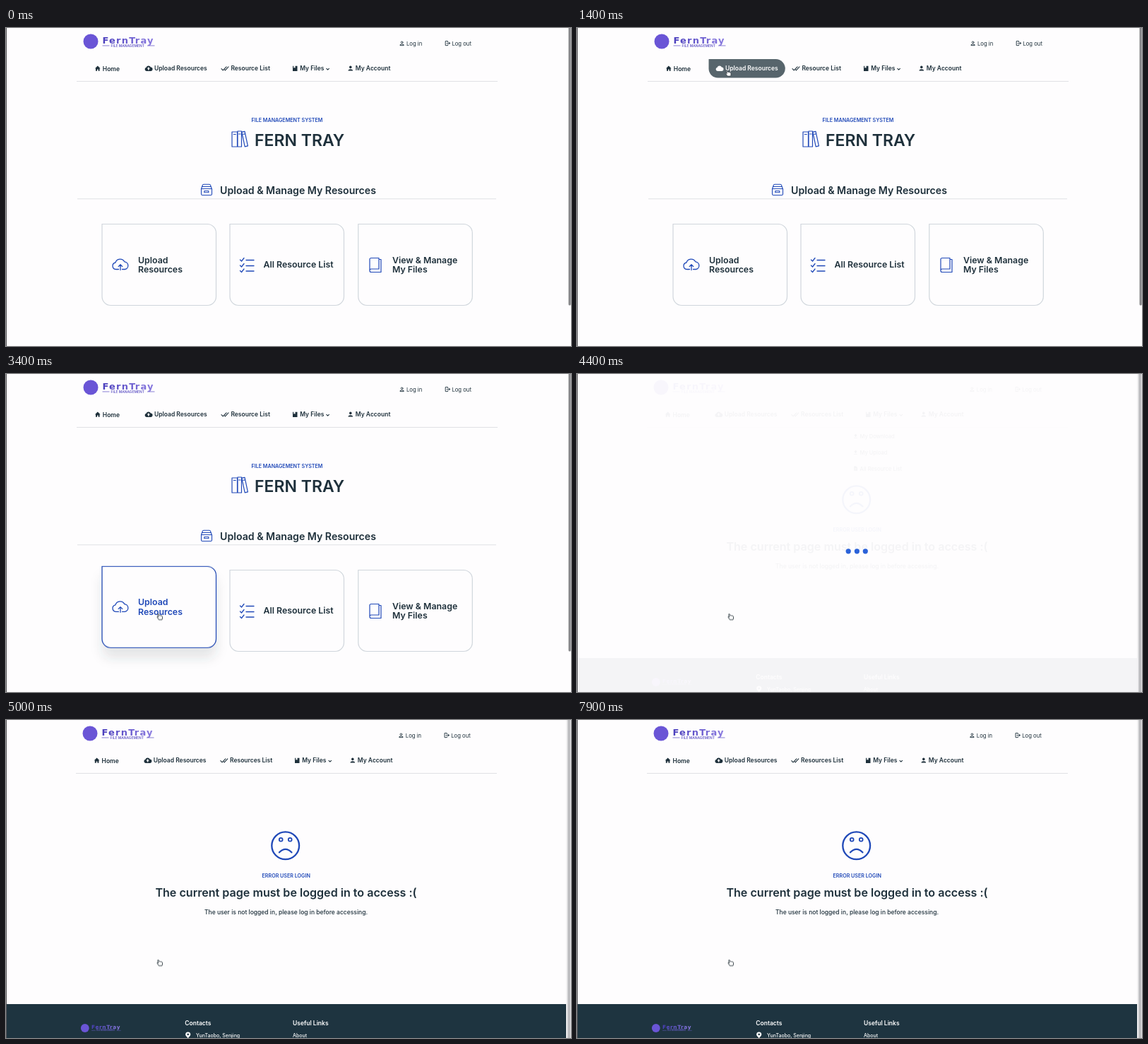
These frames come from a looping animation (800 by 450 pixels, 8 s). An HTML page:

```html
<!DOCTYPE html>
<html lang="en">
<head>
<meta charset="utf-8">
<title>File management demo</title>
<style>
  html, body { margin: 0; width: 100%; height: 100%; overflow: hidden; background: #fefdfe; }
  svg { display: block; width: 100vw; height: 100vh; color: #1e303b; font: 600 8.5px Inter, "Open Sans", sans-serif; }
  text { fill: currentColor; }
  .fill { fill: currentColor; }
  .line { fill: none; stroke: currentColor; stroke-linecap: round; stroke-linejoin: round; }
  .blue { color: #2049b8; }
  .small { font-size: 7.7px; font-weight: 400; }
  .menu { font-size: 7.5px; font-weight: 500; }
  .kicker { font-size: 7.15px; text-anchor: middle; }
  .title { font-size: 23px; }
  .section { font-size: 14.15px; }
  .card text { font-size: 12.35px; }
  .error { font-size: 16.1px; text-anchor: middle; }
  .note { font-size: 8.5px; font-weight: 500; text-anchor: middle; }
  .foot { font-size: 7px; font-weight: 500; }
  .brand { font: bold 13px "DejaVu Sans", sans-serif; letter-spacing: 1.2px; fill: url(#violet); }
  .tag { font-size: 4.9px; fill: #6a5fc9; }
  .pill { color: #fff; }
  .pill path { fill: #56646b; }

  /* every part shares one 8 s clock */
  .anim { animation: 8s linear infinite; }
  .page1 { animation-name: page1; animation-timing-function: step-end; }
  .page2 { animation-name: page2; animation-timing-function: step-end; }
  .p-files { animation-name: pFiles; }
  .p-list { animation-name: pList; }
  .p-upload { animation-name: pUpload; }
  .p-home { animation-name: pHome; }
  .drop { animation-name: drop; }
  .drop2 { animation-name: drop2; }
  .chev { animation-name: chev; animation-timing-function: step-end; }
  .lift { animation-name: lift; animation-timing-function: ease; }
  .glow { animation-name: glow; animation-timing-function: ease; }
  .veil { animation-name: veil; }
  .dots { animation-name: dots; }
  .cursor { animation-name: move; animation-timing-function: ease-in-out; }
  .hand { animation-name: hand; animation-timing-function: step-end; }
  .arrow { animation-name: arrow; animation-timing-function: step-end; }
  .dots circle { animation: pulse .8s ease-in-out infinite; }

  @keyframes page1 { 0% { visibility: visible } 49.4%, 100% { visibility: hidden } }
  @keyframes page2 { 0% { visibility: hidden } 49.4%, 100% { visibility: visible } }
  @keyframes pFiles { 0%, 7% { opacity: 0 } 8.5%, 9.5% { opacity: 1 } 11.5%, 100% { opacity: 0 } }
  @keyframes pList { 0%, 9.8% { opacity: 0 } 11.2%, 13% { opacity: 1 } 15%, 100% { opacity: 0 } }
  @keyframes pUpload { 0%, 13.1% { opacity: 0 } 14.4%, 17.5% { opacity: 1 } 20%, 100% { opacity: 0 } }
  @keyframes pHome { 0%, 18% { opacity: 0 } 20%, 31% { opacity: 1 } 33.5%, 100% { opacity: 0 } }
  @keyframes drop { 0%, 7% { opacity: 0 } 10%, 13% { opacity: 1 } 15.5%, 100% { opacity: 0 } }
  @keyframes drop2 { 0%, 55% { opacity: 1 } 57.5%, 100% { opacity: 0 } }
  @keyframes chev { 0% { opacity: 1 } 7% { opacity: 0 } 15%, 100% { opacity: 1 } }
  @keyframes lift {
    0%, 36% { transform: translateY(0); color: #1e303b }
    39.5%, 100% { transform: translateY(-5.2px); color: #2049b8 }
  }
  @keyframes glow { 0%, 36% { opacity: 0 } 39.5%, 100% { opacity: 1 } }
  @keyframes veil { 0%, 54.5% { opacity: 1 } 55%, 55.1% { opacity: .955 } 60%, 100% { opacity: 0 } }
  @keyframes dots { 0%, 55.1% { opacity: 1 } 60%, 100% { opacity: 0 } }
  @keyframes pulse { 0%, 100% { r: 2.6px } 50% { r: 3.6px } }
  @keyframes move {
    0%, 3.5% { transform: translate(575px, 92px) }
    6% { transform: translate(510px, 64px) }
    8% { transform: translate(438px, 63px) }
    10.5% { transform: translate(345px, 64px) }
    12.5%, 15% { transform: translate(270px, 66px) }
    20%, 30% { transform: translate(160px, 62px) }
    37%, 40% { transform: translate(212px, 325px) }
    42.5%, 100% { transform: translate(218px, 343.5px) }
  }
  @keyframes hand { 0% { opacity: 0 } 5% { opacity: 1 } 31% { opacity: 0 } 36%, 100% { opacity: 1 } }
  @keyframes arrow { 0% { opacity: 0 } 2.5% { opacity: 1 } 5% { opacity: 0 } 31% { opacity: 1 } 36%, 100% { opacity: 0 } }
</style>
</head>
<body>
<svg viewBox="0 0 800 450">
  <defs>
    <linearGradient id="violet">
      <stop offset="0" stop-color="#4b3fbd"/>
      <stop offset="1" stop-color="#8b7be0"/>
    </linearGradient>
    <filter id="soft" x="-30%" y="-30%" width="160%" height="160%"><feGaussianBlur stdDeviation="8"/></filter>

    <g id="logo">
      <circle cx="120" cy="19" r="10.5" fill="#6a55d6"/>
      <text class="brand" x="136.5" y="21.5">FernTray</text>
      <path d="M136.5 25h10M200 25h10.5" stroke="#6a5fc9" stroke-width=".8"/>
      <text class="tag" x="148.5" y="26.8">FILE MANAGEMENT</text>
    </g>

    <g id="auth" class="small">
      <g class="line" stroke-width=".9">
        <circle cx="560.6" cy="20.3" r="1.3"/>
        <path d="M558 24.3v-.6q2.6-1.8 5.2 0v.6z"/>
        <path d="M625.5 19.6v-1h-3.3v6.1h3.3v-1M624.2 21.6h4.4l-1.5-1.5m1.5 1.5l-1.5 1.5"/>
      </g>
      <text x="567" y="24.6">Log in</text>
      <text x="631.4" y="24.6">Log out</text>
    </g>

    <g id="home">
      <path class="fill" d="M126 57.2l3.8-3.8 3.8 3.8h-1v3.6h-2v-2.4h-1.6v2.4h-2v-3.6z"/>
      <text x="136.8" y="61">Home</text>
    </g>
    <g id="upload">
      <path class="fill" d="M199 61a2.7 2.7 0 0 1-.4-5.3 3.4 3.4 0 0 1 6.3-.3 2.8 2.8 0 0 1-.3 5.6z"/>
      <path d="M201.8 55.3l2.2 2.3h-1.4v1.9h-1.6v-1.9h-1.4z" fill="#fefdfe"/>
      <text x="210" y="60.2">Upload Resources</text>
    </g>
    <path id="checks" class="line" stroke-width="1.1" d="M305 57.6l2.2 2.3 4.9-5.1M309.6 59.2l.8.7 4.6-5.1"/>
    <g id="list">
      <use href="#checks"/>
      <text x="318.4" y="60.2">Resource List</text>
    </g>
    <g id="files">
      <path class="fill" d="M406 53.8h1.2v3l1.2-.8 1.2.8v-3h2.9v7.2h-6.5z"/>
      <text x="416.2" y="60.2">My Files</text>
    </g>
    <path id="down" class="line" stroke-width="1.1" d="M453.8 57.4l1.8 1.7 1.8-1.7"/>
    <g id="account">
      <g class="fill">
        <circle cx="487.8" cy="55.4" r="1.8"/>
        <path d="M484.6 60.4v-.8q3.2-2.7 6.4 0v.8z"/>
      </g>
      <text x="494.8" y="60.2">My Account</text>
    </g>

    <path id="arrowUp" class="fill" d="M388.5 83.8l2.3 2.5h-1.4v1.8h-1.8v-1.8h-1.4zM386.2 88.9h4.6v.9h-4.6z"/>
    <g id="dropdown" class="menu">
      <use href="#arrowUp"/>
      <use href="#arrowUp" y="23"/>
      <path class="fill" d="M386.2 129.6h3l1.8 1.8v4.4h-4.8z"/>
      <path d="M387.2 132.6h2.6m-2.6 1.5h2.6" stroke="#fff" stroke-width=".6"/>
      <text x="394.6" y="89.7">My Download</text>
      <text x="394.6" y="112.7">My Upload</text>
      <text x="394.6" y="135.7">All Resource List</text>
    </g>

    <path id="frame" d="M136 277.5H285a12.5 12.5 0 0 1 12.5 12.5V380a12.5 12.5 0 0 1-12.5 12.5H148.5a12.5 12.5 0 0 1-12.5-12.5z"/>
  </defs>

  <rect width="800" height="450" fill="#fefdfe"/>

  <g class="anim page1">
    <use href="#logo"/>
    <use href="#auth"/>
    <path d="M100 75.5h596M101 241.8h593" stroke="#e0e1e5"/>
    <use href="#home"/>
    <use href="#upload"/>
    <use href="#list"/>
    <use href="#files"/>
    <use href="#down" class="anim chev"/>
    <use href="#account"/>

    <g class="anim pill p-files">
      <path d="M396 44h59a13.2 13.2 0 0 1 0 26.5h-46a13 13 0 0 1-13-13z"/>
      <use href="#files"/>
    </g>
    <g class="anim pill p-list">
      <path d="M295 44h76a13.2 13.2 0 0 1 0 26.5h-63a13 13 0 0 1-13-13z"/>
      <use href="#list"/>
    </g>
    <g class="anim pill p-upload">
      <path d="M186.5 44h95a13.2 13.2 0 0 1 0 26.5h-82a13 13 0 0 1-13-13z"/>
      <use href="#upload"/>
    </g>
    <g class="anim pill p-home">
      <path d="M100.5 44h72a13.2 13.2 0 0 1 0 26.5h-59a13 13 0 0 1-13-13z"/>
      <use href="#home"/>
    </g>

    <text class="kicker blue" x="398" y="133.2">FILE MANAGEMENT SYSTEM</text>
    <path class="line blue" stroke-width="1.2" d="M320 147h7.5v21h-7.5zM328 146h5.5v22h-5.5zM333.8 147.2l4.2-.9 4.4 20.6-4.2.9zM322.3 150.5h3M329.7 150h2.2M336 150.4l2-.4"/>
    <text class="title" x="352" y="166.8">FERN TRAY</text>

    <path class="line blue" stroke-width="1.1" d="M276.5 227.5l1.8-5q.4-1.2 1.6-1.2h8q1.200 0 1.600 1.200l1.800 5zv7.500q0 1.500 1.500 1.500h12q1.500 0 1.500-1.500v-7.500M278 224.500h11.800M280.800 230.500v2.200h6v-2.200z"/>
    <text class="section" x="303" y="235.2">Upload &amp; Manage My Resources</text>

    <g class="anim card lift">
      <use href="#frame" class="anim glow" y="15" fill="#3c4450" fill-opacity=".13" filter="url(#soft)"/>
      <use href="#frame" fill="#fefdfe" stroke="#d0d6dc" stroke-width="1.2"/>
      <use href="#frame" class="anim glow" fill="none" stroke="#2049b8" stroke-width="1.2"/>
      <path class="line blue" stroke-width="1.3" d="M159.5 341.500h-4a4.800 4.800 0 0 1-.6-9.500 7 7 0 0 1 12.900-1.200 5.400 5.400 0 0 1 .6 10.700h-3.900M162 342.500v-7.500m-2.800 2.600l2.800-2.800 2.800 2.800"/>
      <text x="187" y="332.6">Upload</text>
      <text x="187" y="346.3">Resources</text>
    </g>
    <g class="card">
      <use href="#frame" x="181" fill="#fefdfe" stroke="#d0d6dc" stroke-width="1.2"/>
      <path class="line blue" stroke-width="1.3" d="M331.5 328l2 2 3.5-4.5M331.5 336l2 2 3.5-4.5M331.5 343.5l2 2 3.5-4.5M340 328.5h11M340 336.5h11M340 344h11"/>
      <text x="364.5" y="339.3">All Resource List</text>
    </g>
    <g class="card">
      <use href="#frame" x="362.8" fill="#fefdfe" stroke="#d0d6dc" stroke-width="1.2"/>
      <path class="line blue" stroke-width="1.2" d="M515 343v-15.500q0-2 2-2h11v15.500h-11q-2 0-2 2.200 0 2.300 2 2.300h14v-18h-2.500"/>
      <text x="547" y="332.6">View &amp; Manage</text>
      <text x="547" y="346.3">My Files</text>
    </g>

    <g class="anim drop">
      <rect x="375" y="78" width="132" height="66" fill="#445870" opacity=".13" filter="url(#soft)"/>
      <rect x="375" y="76" width="132" height="68" fill="#fefdfe"/>
      <use href="#dropdown"/>
    </g>
    <rect x="796.5" y="-4" width="3.2" height="396.5" rx="1.6" fill="#858588"/>
  </g>

  <g class="anim page2">
    <use href="#logo" x="-1"/>
    <use href="#auth" x="-1.2"/>
    <path d="M99 75.5h596" stroke="#e0e1e5"/>
    <use href="#home" x="-1.2"/>
    <use href="#upload" x="-1.2"/>
    <use href="#checks" x="-1.2"/>
    <text x="317" y="60.2">Resources List</text>
    <use href="#files" x="3"/>
    <use href="#down" x="3.2"/>
    <use href="#account" x="3"/>
    <use href="#dropdown" class="anim drop2" x="6" y="1"/>

    <g class="line blue" stroke-width="2.3">
      <circle cx="395.7" cy="177.8" r="19.4"/>
      <g stroke-width="1.8">
        <circle cx="389.2" cy="169.3" r="2.4"/>
        <circle cx="402.2" cy="169.3" r="2.4"/>
      </g>
      <path d="M387 187.3q8.7-9 17.4 0"/>
    </g>
    <text class="kicker blue" x="396.7" y="223">ERROR USER LOGIN</text>
    <text class="error" x="396.5" y="250">The current page must be logged in to access :(</text>
    <text class="note" x="396.5" y="274.9">The user is not logged in, please log in before accessing.</text>

    <rect y="402" width="793.5" height="48" fill="#1e3440"/>
    <use href="#logo" transform="translate(44.3 425.3) scale(.5625)"/>
    <g color="#fff">
      <text x="253.3" y="431.7">Contacts</text>
      <text x="406" y="431.7">Useful Links</text>
      <path class="fill" fill-rule="evenodd" d="M257.7 450.3c-2.3-2.7-3.6-3.7-3.6-5.3a3.6 3.6 0 0 1 7.2 0c0 1.6-1.3 2.6-3.6 5.3zm0-6.7a1.3 1.3 0 1 0 .01 0z"/>
      <text class="foot" x="269" y="448.5">YunTaobo, Senjing</text>
      <text class="foot" x="406" y="448.5">About</text>
    </g>

    <rect class="anim veil" width="800" height="450" fill="#fefdfe"/>
    <g class="anim dots" fill="#2b62d9">
      <circle cx="384.2" cy="250.8" r="3.6"/>
      <circle cx="396.4" cy="250.8" r="3.6"/>
      <circle cx="408.3" cy="250.8" r="3.6"/>
    </g>
    <rect x="793" width="7" height="450" fill="#f0eff1"/>
    <rect x="795.2" width="4" height="450" fill="#bdbdc0"/>
  </g>

  <rect width="1" height="450" fill="#58585c"/>

  <g class="anim cursor">
    <path class="anim hand" d="M-1.7 4.2l-2.2-3.6q-.5-1.2.8-1l1 .8-1.2-3.6q.2-1.2 1.3-.6l1.1 2.3q.6-.8 1.3 0 .8-.7 1.4.2 1.2-.3 1.5 1l.3 2.3-.7 2.2z" fill="#fff" stroke="#2a353c" stroke-width=".9" stroke-linejoin="round"/>
    <path class="anim arrow" d="M-3-4.5v9l2.1-1.9 1.4 3 1.3-.6-1.4-2.9h2.8z" fill="#111" stroke="#fff" stroke-width=".7"/>
  </g>
</svg>
</body>
</html>
```
